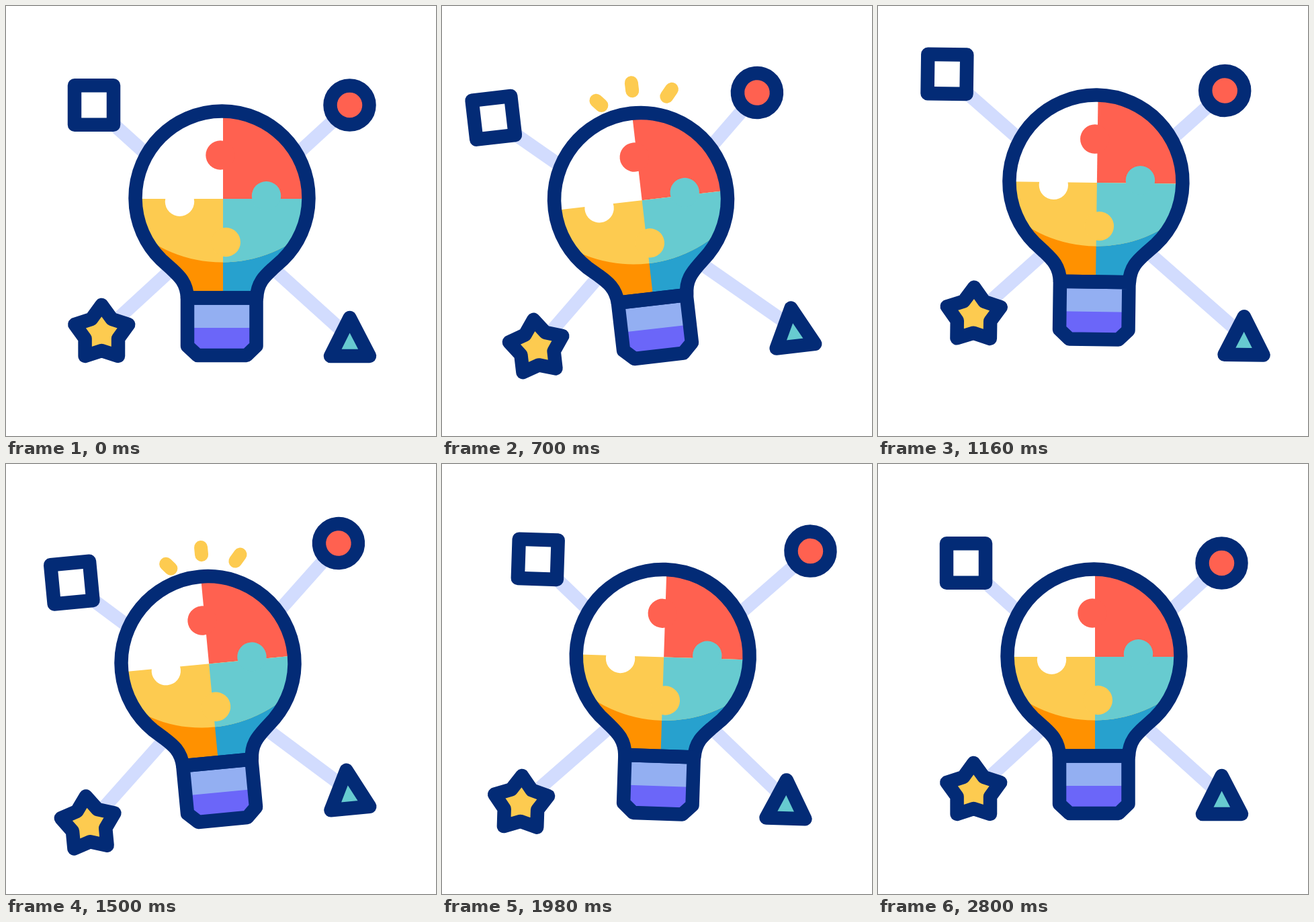
Animation, 640 px wide and 640 px high, one loop 3 s. Source, as an HTML page with a canvas:

```html
<!DOCTYPE html>
<html>
<head>
<meta charset="utf-8">
<style>
  html, body { margin: 0; height: 100%; overflow: hidden; background: #fff; }
  canvas { display: block; width: 640px; height: 640px; }
</style>
</head>
<body>
<canvas id="stage" width="640" height="640"></canvas>
<script>
const ctx = document.getElementById('stage').getContext('2d');
const NAVY = '#032b76', RED = '#ff6150', YELLOW = '#fdcb50', TEAL = '#67cbd0',
  ORANGE = '#ff9100', BLUE = '#27a1ce', LINK = '#d2dcfe', PURPLE = '#be9bf3';
const LOOP = 3000, BEAT = 760, SHINE_BEAT = 805, STROKE = 20.5;
const PIVOT_X = 321, PIVOT_Y = 508;

const bulb = new Path2D('M270 434.5C269 412 258 402 246 391L231 377.5A129 129 0 1 1 412 377.5L397 391C385 402 374 412 373 434.5Z');
const base = new Path2D('M270 434.5V506L285 520H358L372.5 506V434.5Z');
const square = new Path2D('M102 118.3H160V176.7H102Z');
const triangle = new Path2D('M511.5 464L541 521H483Z');
const disc = circle(511.5, 147.5, 29);
const litArea = circle(321.5, 186.5, 195);
const star = new Path2D();
for (let i = 0; i < 10; i++) {
  const r = i % 2 ? 26 : 42, a = (i / 5 - 0.5) * Math.PI;
  star.lineTo(142.3 + r * Math.cos(a), 487 + r * Math.sin(a));
}
star.closePath();

// Seams between the puzzle pieces, each about SEAM_LENGTH long.
const SEAM_LENGTH = 330;
const seams = [
  new Path2D('M193 285H236V289A21.5 21.5 0 0 0 279 289V285H366V281A21 21 0 0 1 408 281V285H450'),
  new Path2D('M321 156V199.4A21 21 0 1 0 321 240.6V330.9A21 21 0 1 1 321 371.1V434')
];

function circle(x, y, r) {
  const path = new Path2D();
  path.arc(x, y, r, 0, 2 * Math.PI);
  return path;
}

function ease(t, start, end) {
  const p = Math.min(1, Math.max(0, (t - start) / (end - start)));
  return (1 - Math.cos(Math.PI * p)) / 2;
}

// Rises from a to b, holds, falls from c to d.
const pulse = (t, a, b, c, d) => ease(t, a, b) - ease(t, c, d);
const twice = (t, beat, ...times) => pulse(t, ...times) + pulse(t - beat, ...times);

function line(x1, y1, x2, y2, color, width = 20) {
  ctx.strokeStyle = color;
  ctx.lineWidth = width;
  ctx.beginPath();
  ctx.moveTo(x1, y1);
  ctx.lineTo(x2, y2);
  ctx.stroke();
}

function outline(path, color = NAVY) {
  ctx.strokeStyle = color;
  ctx.lineWidth = STROKE;
  ctx.stroke(path);
}

function fill(path, color) {
  ctx.fillStyle = color;
  ctx.fill(path);
}

function rect(color, x, y, w, h) {
  ctx.fillStyle = color;
  ctx.fillRect(x, y, w, h);
}

function clipped(path, draw) {
  ctx.save();
  ctx.clip(path);
  draw();
  ctx.restore();
}

function satellite(path, color, dx, dy) {
  ctx.save();
  ctx.translate(dx, dy);
  fill(path, color);
  outline(path);
  ctx.restore();
}

function drawSatellites(a, b) {
  const ax = 36 * a, ay = 21 * a, bx = 35.5 * b, by = 36.5 * b;
  line(131 - ax, 150 - ay, 512 + ax, 494 + ay, LINK);
  line(512 + bx, 148 - by, 142 - bx, 488 + by, LINK);
  satellite(square, '#fff', -ax, -ay);
  satellite(triangle, TEAL, ax, ay);
  satellite(disc, RED, bx, -by);
  satellite(star, YELLOW, -bx, by);
}

function drawRays(p) {
  if (p <= 0) return;
  for (const side of [-1, 0, 1]) {
    const x = 327.3 + 40 * side, y = 137 + 12 * side * side;
    const angle = side * 0.72, length = (58 + 6 * side) * p;
    const dx = length * Math.sin(angle), dy = -length * Math.cos(angle);
    line(x + 0.53 * dx, y + 0.53 * dy, x + dx, y + dy, YELLOW, 20 * Math.min(1, p / 0.35));
  }
}

function drawSeams(head, tail) {
  if (head <= tail) return;
  ctx.setLineDash([(head - tail) * SEAM_LENGTH, 2000]);
  ctx.lineDashOffset = -tail * SEAM_LENGTH;
  seams.forEach(seam => outline(seam, PURPLE));
  ctx.setLineDash([]);
}

function drawBulb(head, tail) {
  clipped(bulb, () => {
    rect('#fff', 180, 140, 290, 300);
    rect(RED, 323, 140, 147, 147);
    rect(ORANGE, 180, 330, 290, 110);
    rect(BLUE, 323, 330, 147, 110);
    clipped(litArea, () => {
      rect(YELLOW, 180, 287, 290, 110);
      rect(TEAL, 323, 287, 147, 110);
    });
    fill(circle(319, 222, 21.7), RED);
    fill(circle(258.5, 291.2, 21.7), '#fff');
    fill(circle(387.5, 282.7, 21.7), TEAL);
    fill(circle(327.3, 351.5, 21.7), YELLOW);
    drawSeams(head, tail);
  });
  clipped(base, () => {
    rect('#93aff2', 265, 434, 115, 90);
    rect('#6b66f9', 265, 479, 115, 45);
  });
  outline(bulb);
  outline(base);
}

function frame() {
  const t = performance.now() % LOOP;
  const hop = 61 * twice(t, BEAT, 475, 905, 905, 1240) - 32 * pulse(t, 220, 480, 1665, 2000);
  const tilt = 10.9 * twice(t, BEAT, 660, 985, 1020, 1410) - 7 * pulse(t, 220, 650, 1780, 2170);
  const stretch = u => pulse(u, 571, 882, 1102, 1420);

  rect('#fff', 0, 0, 640, 640);
  ctx.save();
  ctx.lineCap = ctx.lineJoin = 'round';
  ctx.translate(PIVOT_X, PIVOT_Y + hop);
  ctx.rotate(tilt * Math.PI / 180);
  ctx.translate(-PIVOT_X, -PIVOT_Y);
  drawSatellites(stretch(t), stretch(t - BEAT));
  drawRays(twice(t, SHINE_BEAT, 590, 830, 1020, 1140));
  drawBulb(ease(t, 2060, 2540), ease(t, 2260, 2740));
  ctx.restore();
  requestAnimationFrame(frame);
}
frame();
</script>
</body>
</html>
```
